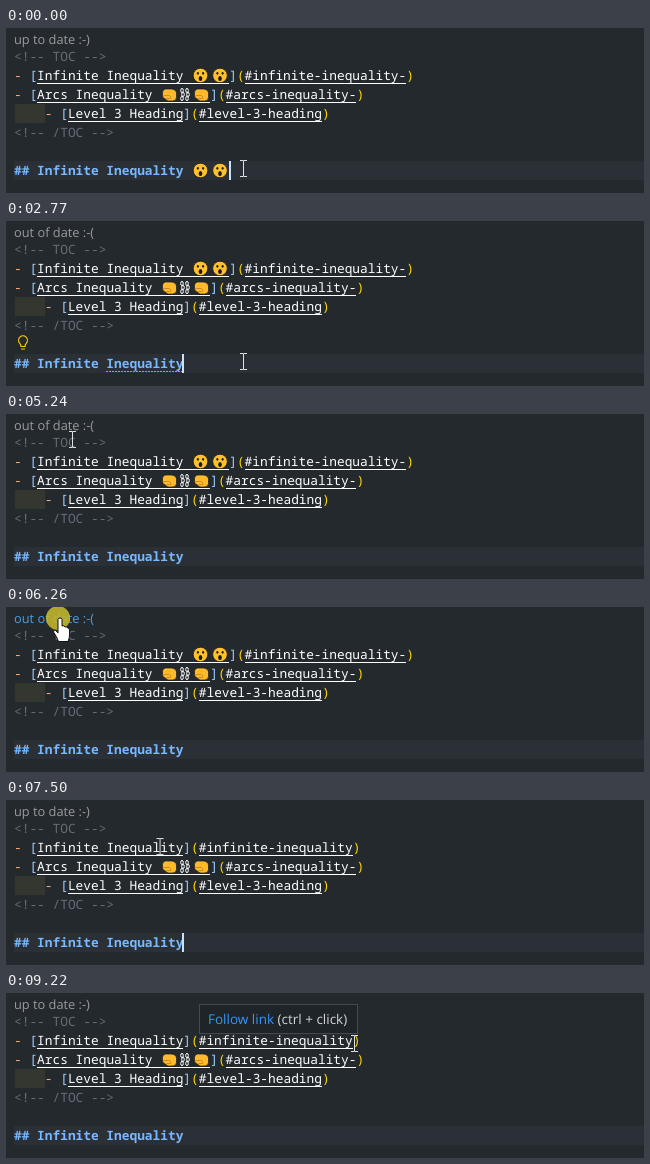
Write an HTML page that moves like this. It is 638 px wide and 165 px high and loops after 9360 ms.

```html
<!DOCTYPE html>
<html lang="en">
<head>
<meta charset="utf-8">
<title>Table of contents update</title>
<style>
html, body { margin: 0; width: 100%; height: 100%; overflow: hidden; background: #24292e; }
svg.stage { display: block; width: 638px; height: 165px; }
text { white-space: pre; text-rendering: geometricPrecision; }
.code { font: 500 12.83px "Noto Sans Mono", "DejaVu Sans Mono", monospace; fill: #fff; }
.ui { font: 12.8px "Open Sans", "Noto Sans", sans-serif; }
.pop { font-size: 13.5px; }
.note { fill: #646d77; font-weight: 400; }
.dash { fill: #ffab70; }
.sq { fill: #9ed0ff; }
.par { fill: #ffd700; }
.head { fill: #79b8ff; font-weight: 700; }
.line { fill: #fff; }
.wave { fill: none; stroke: #cca700; stroke-width: 1; }

/* one loop is 9360 ms; 1% = 93.6 ms */
.t { animation: 9360ms step-end infinite; }
#lens { animation-name: lens; }
#fresh { animation-name: fresh; }
#stale { animation-name: stale; }
#old { animation-name: old; }
#new { animation-name: new; }
#face1 { animation-name: face1; }
#face2 { animation-name: face2; }
#spaceWave { animation-name: spaceWave; }
#wordWave { animation-name: wordWave; }
#bulb { animation-name: bulb; }
#caret { animation-name: blink, caretMove; }
#popup { animation-name: popup; }
#click { animation-name: click; }
#beam { animation-name: beam; }
#hand { animation-name: hand; }
#mouse { animation: mouse 9360ms linear infinite; }

@keyframes lens { 0%, 74.57%, 100% { fill: #999b9d } 57.69% { fill: #4e9ede } }
@keyframes fresh { 0%, 69.23%, 100% { opacity: 1 } 15.38% { opacity: 0 } }
@keyframes stale { 0%, 69.23%, 100% { opacity: 0 } 15.38% { opacity: 1 } }
@keyframes old { 0% { opacity: 1 } 69.01%, 100% { opacity: 0 } }
@keyframes new { 0% { opacity: 0 } 69.01%, 100% { opacity: 1 } }
@keyframes face1 { 0% { opacity: 1 } 16.45%, 100% { opacity: 0 } }
@keyframes face2 { 0% { opacity: 1 } 10.04%, 100% { opacity: 0 } }
@keyframes spaceWave { 0%, 27.88%, 100% { opacity: 0 } 22.22% { opacity: 1 } }
@keyframes wordWave { 0%, 32.58%, 100% { opacity: 0 } 27.88% { opacity: 1 } }
@keyframes bulb { 0%, 34.93%, 100% { opacity: 0 } 29.59% { opacity: 1 } }
@keyframes popup { 0% { opacity: 0 } 93.58%, 100% { opacity: 1 } }
@keyframes click { 0%, 68.58%, 100% { opacity: 0 } 66.87% { opacity: 1 } }
@keyframes beam { 0%, 74.57%, 98.5%, 100% { opacity: 1 } 57.69%, 95.93% { opacity: 0 } }
@keyframes hand { 0%, 74.57%, 100% { opacity: 0 } 57.69% { opacity: 1 } }
@keyframes blink {
  0%, 8.76%, 16.45%, 27.02%, 37.49%, 48.07%, 58.76%, 69.23%, 79.91%, 90.59% { opacity: 1 }
  3.52%, 15.17%, 21.79%, 32.15%, 42.73%, 53.41%, 64.1%, 74.57%, 85.25%, 95.93%, 100% { opacity: 0 }
}
@keyframes caretMove {
  0% { transform: translateX(223px) }
  10.04% { transform: translateX(204px) }
  16.45% { transform: translateX(184px) }
  27.02%, 100% { transform: translateX(176px) }
}
@keyframes mouse {
  0% { transform: translate(237px, 140px) }
  45.72% { transform: translate(237px, 140px); animation-timing-function: cubic-bezier(.4, 0, .5, 1) }
  55.55% { transform: translate(66px, 26px) }
  55.98% { transform: translate(66px, 25px); animation-timing-function: ease-out }
  64.1% { transform: translate(54px, 11px) }
  74.14% { transform: translate(54px, 11px); animation-timing-function: cubic-bezier(.4, 0, .8, .7) }
  80.12% { transform: translate(152px, 46px); animation-timing-function: cubic-bezier(.25, .4, .6, 1) }
  83.97% { transform: translate(346px, 50px); animation-timing-function: ease-in-out }
  87.5% { transform: translate(343px, 52px); animation-timing-function: ease-in-out }
  91.23%, 100% { transform: translate(348px, 50px) }
}
</style>
</head>
<body>
<svg class="stage" viewBox="0 0 638 165">
  <defs>
    <g id="face">
      <circle r="7.3" fill="#ffc02e" stroke="#17191c" stroke-width=".8"/>
      <ellipse cx="-2.6" cy="-2.2" rx="1" ry="1.4" fill="#17191c"/>
      <ellipse cx="2.6" cy="-2.2" rx="1" ry="1.4" fill="#17191c"/>
      <ellipse cy="3" rx="1.8" ry="2.5" fill="#17191c"/>
    </g>
    <g id="fist" stroke="#17191c" stroke-width=".7">
      <path d="M-7-2Q-7-5-4-5.500H2Q7-5 7-1V3Q7 6.500 3 6.500H-1Q-3 6.500-4 4.500Q-7 4-7 1Z" fill="#ffb92a"/>
      <path d="M-6 1H0Q2 2 1 4H-3" fill="none" stroke="#b57a18"/>
    </g>
    <g id="chain" fill="none" stroke="#fff">
      <g id="links">
        <ellipse cx="-3" cy="-4" rx="1.300" ry="2.100"/>
        <ellipse cx="-2" rx="1.300" ry="2.100"/>
        <ellipse cx="-3" cy="4" rx="1.300" ry="2.100"/>
      </g>
      <use href="#links" x="5"/>
    </g>
  </defs>

  <rect width="638" height="165" fill="#24292e"/>
  <rect x="8" y="133" width="630" height="19" fill="#2b3036"/>
  <rect x="9" y="76" width="30" height="19" fill="#33372f"/>

  <g id="lens" class="ui t" fill="#999b9d">
    <text id="fresh" class="t" x="8" y="16">up to date :-)</text>
    <text id="stale" class="t" x="8" y="16">out of date :-(</text>
  </g>

  <g class="code">
    <text class="note" x="8" y="33">&lt;!-- TOC --&gt;</text>

    <text x="8" y="52"><tspan class="dash">- </tspan><tspan class="sq">[</tspan>Infinite Inequality</text>
    <g id="old" class="t">
      <use href="#face" x="194.500" y="47.500"/>
      <use href="#face" x="214" y="47.500"/>
      <text x="223.200" y="52"><tspan class="sq">]</tspan><tspan class="par">(</tspan>#infinite-inequality-<tspan class="par">)</tspan></text>
      <path class="line" d="M31 55H223v1H31ZM239 55H400v1H239Z"/>
    </g>
    <g id="new" class="t" opacity="0">
      <text x="177.300" y="52"><tspan class="sq">]</tspan><tspan class="par">(</tspan>#infinite-inequality<tspan class="par">)</tspan></text>
      <path class="line" d="M31 55H177v1H31ZM193 55H347v1H193Z"/>
    </g>

    <text x="8" y="71"><tspan class="dash">- </tspan><tspan class="sq">[</tspan>Arcs Inequality</text>
    <use href="#fist" x="163.500" y="66.500"/>
    <use href="#chain" x="179" y="66.500"/>
    <use href="#fist" x="195.500" y="66.500"/>
    <text x="204.200" y="71"><tspan class="sq">]</tspan><tspan class="par">(</tspan>#arcs-inequality-<tspan class="par">)</tspan></text>
    <path class="line" d="M31 74H204v1H31ZM220 74H350v1H220Z"/>

    <text x="38.800" y="90"><tspan class="dash">- </tspan><tspan class="sq">[</tspan>Level 3 Heading<tspan class="sq">]</tspan><tspan class="par">(</tspan>#level-3-heading<tspan class="par">)</tspan></text>
    <path class="line" d="M62 93H177v1H62ZM193 93H316v1H193Z"/>

    <text class="note" x="8" y="109">&lt;!-- /TOC --&gt;</text>
    <text class="head" x="8" y="147">## Infinite Inequality</text>
  </g>

  <g id="face1" class="t"><use href="#face" x="194.500" y="142.500"/></g>
  <g id="face2" class="t"><use href="#face" x="214" y="142.500"/></g>

  <path id="spaceWave" class="wave t" opacity="0" d="M177 151q1.500-3 3 0t3 0 2-1"/>
  <path id="wordWave" class="wave t" opacity="0" d="M100 150.500H177" stroke-dasharray="2 1"/>
  <g id="bulb" class="t" opacity="0" fill="none" stroke="#ffcc00" stroke-width="1.200">
    <path d="M15 125.500Q15 123.500 13.800 122.300A4.400 4.400 0 1 1 20.200 122.300Q19 123.500 19 125.500ZM15 128H19"/>
  </g>
  <rect id="caret" class="t" y="133" width="2" height="19" fill="#c8e1ff"/>

  <g id="popup" class="ui pop t" opacity="0">
    <rect x="193.500" y="11.500" width="158" height="29" fill="#1f2428" stroke="#454a50"/>
    <text x="202" y="31" fill="#d1d5da"><tspan fill="#3794ff">Follow link</tspan> (ctrl + click)</text>
  </g>

  <circle id="click" class="t" opacity="0" cx="52" cy="11" r="12" fill="#c4b72b" fill-opacity=".88"/>
  <g id="mouse">
    <path id="beam" class="t" fill="#dfe2e5" d="M-3-8H0L.5-7.500 1-8H4V-7H1V8H4V9H1L.5 8.500 0 9H-3V8H0V-7H-3Z"/>
    <path id="hand" class="t" opacity="0" fill="#fff" stroke="#111" stroke-width="1"
      d="M-2 1.500Q-2 0 0 0T2 1.500V8Q4 7 5 9Q7 8 7.500 10Q9.500 9.500 9.500 12V17Q9.500 20 8 23.500H-1.500Q-3 19-6.500 14Q-6.500 11.500-4.500 12.300L-2 15Z"/>
  </g>
</svg>
</body>
</html>
```
